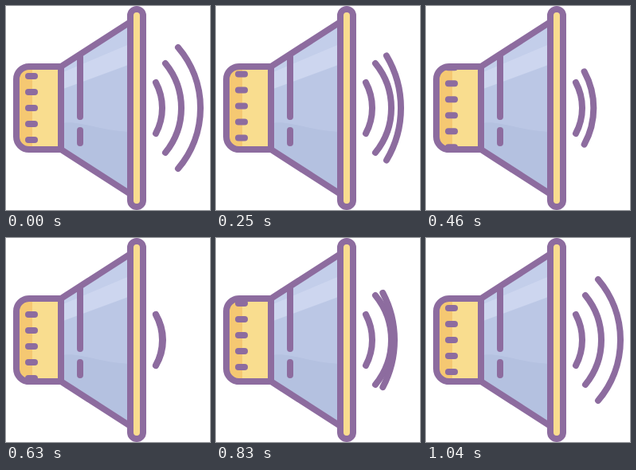
Animation of 256 by 256 pixels, one loop 1.18 s. Source, as an HTML page:

```html
<!DOCTYPE html>
<html lang="en">
<head>
<meta charset="utf-8">
<title>Speaker volume</title>
<style>
  html, body { margin: 0; width: 100%; height: 100%; overflow: hidden; background: #fff; }
  svg { display: block; width: 100vw; height: 100vh; }
  .line { fill: none; stroke: #8d6c9f; stroke-width: 8; stroke-linecap: round; stroke-linejoin: round; }
</style>
</head>
<body>
<svg viewBox="0 0 256 256">
  <defs>
    <clipPath id="bodyClip"><path d="M69 76H29A16 16 0 0 0 13 92V164A16 16 0 0 0 29 180H69Z"/></clipPath>
    <clipPath id="hornClip"><path d="M69 76L156 20V236L69 180Z"/></clipPath>
  </defs>

  <g clip-path="url(#bodyClip)">
    <rect x="9" y="72" width="64" height="112" fill="#f9dd8f"/>
    <rect x="9" y="72" width="24" height="112" fill="#f5c872"/>
    <g id="ridges" class="line"></g>
  </g>

  <g clip-path="url(#hornClip)">
    <rect x="69" y="16" width="90" height="224" fill="#bbc7e5"/>
    <path d="M69 16H159V46L69 84Z" fill="#c3ceea"/>
    <path d="M69 84L159 46V72L69 105Z" fill="#cdd6ef"/>
    <path d="M69 147C95 143 115 157 159 158V240H69Z" fill="#b4c1e0"/>
  </g>

  <path class="line" d="M69 76H29A16 16 0 0 0 13 92V164A16 16 0 0 0 29 180H69Z"/>
  <path class="line" d="M69 76L156 20V236L69 180Z"/>
  <path class="line" d="M93 64V139M93 156V172"/>
  <rect class="line" x="156" y="4" width="16" height="248" rx="8" style="fill:#f9dd8f"/>

  <path class="line" id="inner"/>
  <path class="line" id="middle"/>
  <path class="line" id="outer"/>
</svg>
<script>
const LOOP = 1180, FPS = 24, LEAD = 3, PEAK = 11;
const el = id => document.getElementById(id);

// Outer wave: step, tip x, tip y, rightmost x
const wave = [
  [0, 216, 52, 244],
  [3, 214, 62.5, 232],
  [6, 207, 72, 220],
  [7, 204, 75.5, 217],
  [10, 188, 96, 197],
  [11, 188, 96, 196]
];

// Circular arc, symmetric about y = 128
function arc(tipX, tipY, right) {
  const half = 128 - tipY, sag = right - tipX;
  const r = (half * half + sag * sag) / (2 * sag);
  return `M${tipX} ${tipY}A${r} ${r} 0 0 1 ${tipX} ${256 - tipY}`;
}

function waveAt(n) {
  const i = Math.max(1, wave.findIndex(k => k[0] >= n));
  const a = wave[i - 1], b = wave[i];
  const u = (n - a[0]) / (b[0] - a[0]);
  return a.slice(1).map((v, j) => v + (b[j + 1] - v) * u);
}

// Steps start at multiples of 1/24 s, rounded to 10 ms
const stepStart = k => Math.round(k * 100 / FPS) * 10;
function stepAt(t) {
  let k = Math.floor((t + 5) * FPS / 1000);
  if (stepStart(k) > t) k--;
  const n = Math.min(Math.max(k - LEAD, 0), 2 * PEAK);
  return n > PEAK ? 2 * PEAK - n : n;
}

function draw(n) {
  const turn = (1 - Math.cos(Math.PI * Math.min(n / 10, 1))) / 2;
  el('ridges').setAttribute('transform', `translate(0 ${-12 * turn})`);
  el('outer').setAttribute('d', arc(...waveAt(n)));
  el('middle').style.display = n < 6 ? '' : 'none';
}

let ridges = '';
for (let y = 88; y <= 188; y += 20) ridges += `<path d="M28 ${y}H36"/>`;
el('ridges').innerHTML = ridges;
el('inner').setAttribute('d', arc(188, 96, 196));
el('middle').setAttribute('d', arc(200, 72, 220));

const start = performance.now();
function tick() {
  draw(stepAt((performance.now() - start) % LOOP));
  requestAnimationFrame(tick);
}
tick();
</script>
</body>
</html>
```
